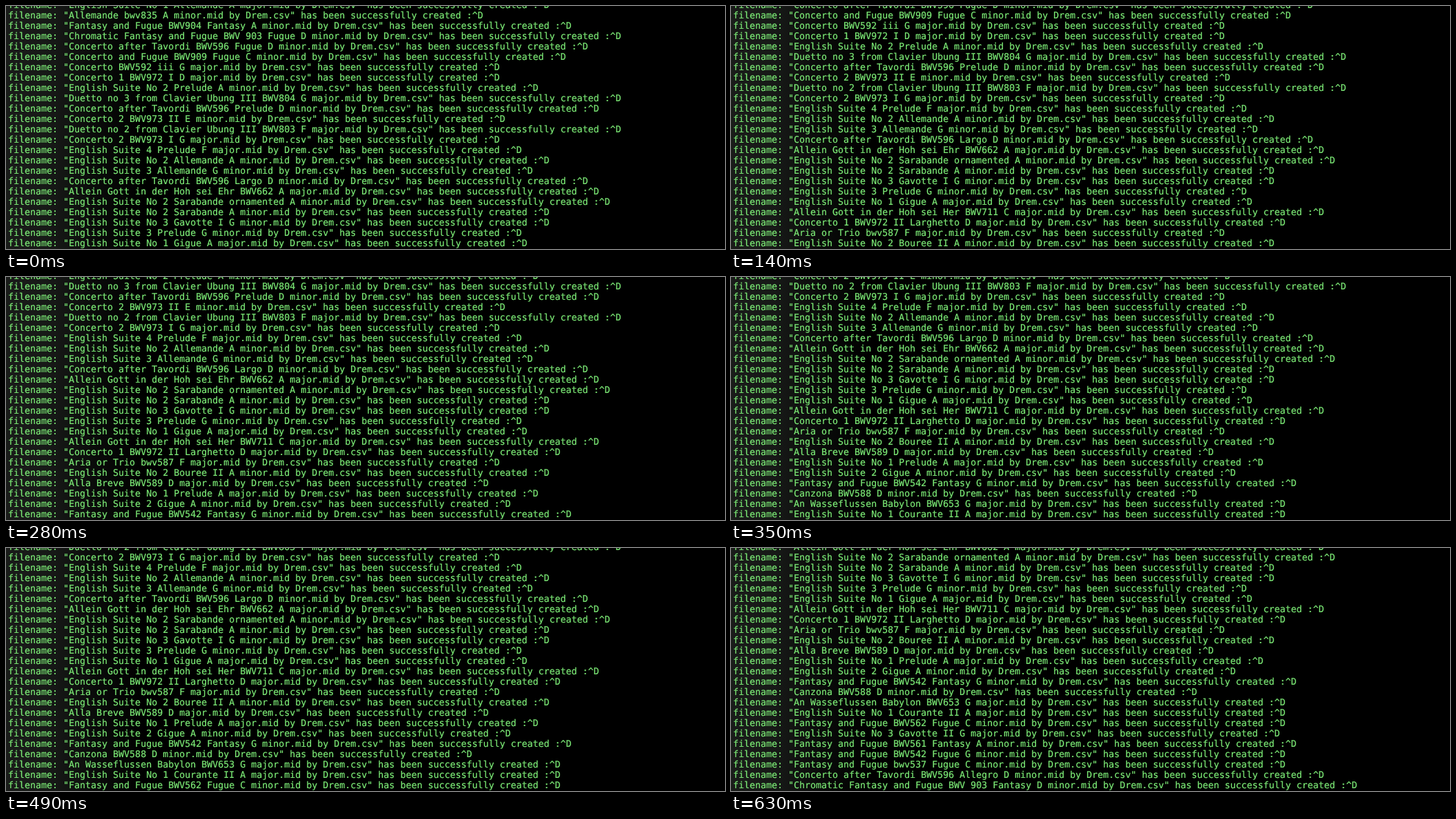
Recreate the animation shown at these times as an HTML page. Size 1042 by 352 pixels, loop 700 ms.

```html
<!DOCTYPE html>
<html lang="en">
<head>
<meta charset="utf-8">
<title>Terminal log</title>
<style>
  html, body {
    margin: 0;
    width: 100%;
    height: 100%;
    overflow: hidden;
    background: #000;
  }
  body {
    position: relative;
    background: linear-gradient(90deg, #1a1c1a, #161816 70px, #0a0b0a 130px, #000 200px);
  }
  #log {
    position: absolute;
    left: 3px;
    top: -8px;
    margin: 0;
    color: #7cea76;
    -webkit-text-stroke: 0.2px;
    font: 13.3px/15px "DejaVu Sans Mono", monospace;
    font-variant-ligatures: none;
    text-rendering: geometricPrecision;
    white-space: pre;
  }
</style>
</head>
<body>
<pre id="log"></pre>
<script>
const LINE_HEIGHT = 15;
const STEP_MS = 70;

const pieces = `English Suite No 1 Allemande A major
Allemande bwv835 A minor
Fantasy and Fugue BWV904 Fantasy A minor
Chromatic Fantasy and Fugue BWV 903 Fugue D minor
Concerto after Tavordi BWV596 Fugue D minor
Concerto and Fugue BWV909 Fugue C minor
Concerto BWV592 iii G major
Concerto 1 BWV972 I D major
English Suite No 2 Prelude A minor
Duetto no 3 from Clavier Ubung III BWV804 G major
Concerto after Tavordi BWV596 Prelude D minor
Concerto 2 BWV973 II E minor
Duetto no 2 from Clavier Ubung III BWV803 F major
Concerto 2 BWV973 I G major
English Suite 4 Prelude F major
English Suite No 2 Allemande A minor
English Suite 3 Allemande G minor
Concerto after Tavordi BWV596 Largo D minor
Allein Gott in der Hoh sei Ehr BWV662 A major
English Suite No 2 Sarabande ornamented A minor
English Suite No 2 Sarabande A minor
English Suite No 3 Gavotte I G minor
English Suite 3 Prelude G minor
English Suite No 1 Gigue A major
Allein Gott in der Hoh sei Her BWV711 C major
Concerto 1 BWV972 II Larghetto D major
Aria or Trio bwv587 F major
English Suite No 2 Bouree II A minor
Alla Breve BWV589 D major
English Suite No 1 Prelude A major
English Suite 2 Gigue A minor
Fantasy and Fugue BWV542 Fantasy G minor
Canzona BWV588 D minor
An Wasseflussen Babylon BWV653 G major
English Suite No 1 Courante II A major
Fantasy and Fugue BWV562 Fugue C minor
English Suite No 3 Gavotte II G major
Fantasy and Fugue BWV561 Fantasy A minor
Fantasy and Fugue BWV542 Fugue G minor
Fantasy and Fugue bwv537 Fugue C minor
Concerto after Tavordi BWV596 Allegro D minor
Chromatic Fantasy and Fugue BWV 903 Fantasy D minor`.split("\n");

const log = document.getElementById("log");
log.textContent = pieces
  .map(piece => `filename: "${piece}.mid by Drem.csv" has been successfully created :^D`)
  .join("\n");

// Lines scrolled off the top at each step; the last value closes the loop.
const scrolled = [0, 2, 4, 6, 8, 11, 12, 12, 15, 18, 18];

log.animate(
  scrolled.map((lines, i) => ({
    offset: i / (scrolled.length - 1),
    transform: `translateY(${-lines * LINE_HEIGHT}px)`,
    easing: "step-end"
  })),
  { duration: STEP_MS * (scrolled.length - 1), iterations: Infinity }
);
</script>
</body>
</html>
```
